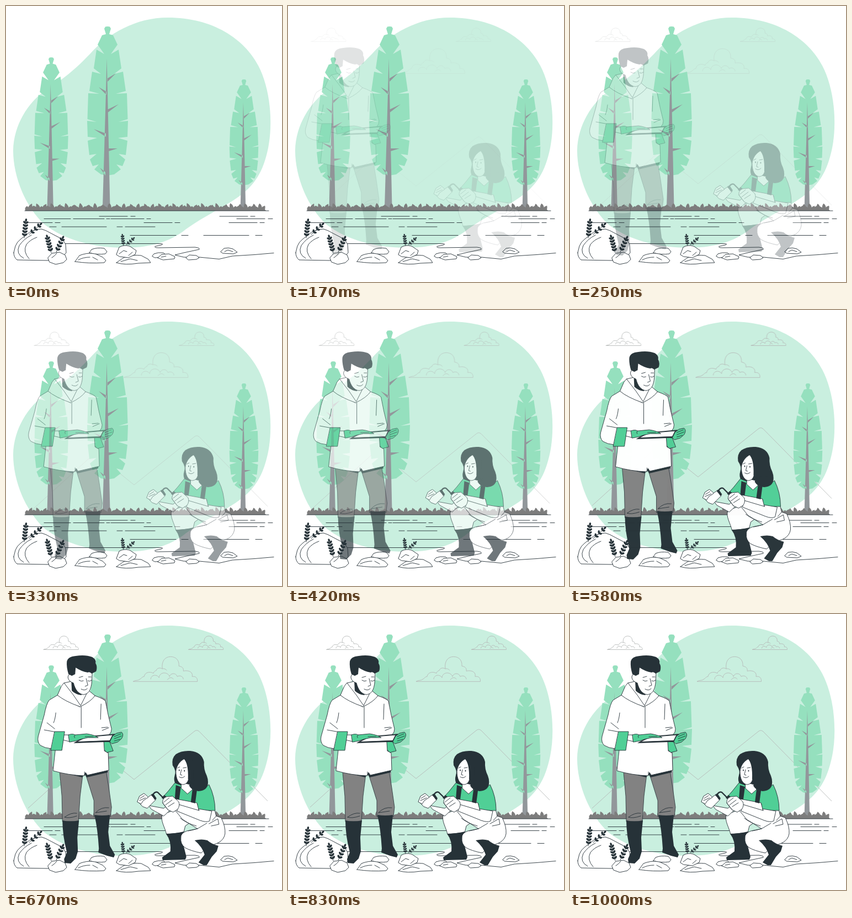
Animation, 500 px wide and 500 px high, one loop 1040 ms. Source, as an HTML page:

```html
<!DOCTYPE html>
<html lang="en">
<head>
<meta charset="utf-8">
<title>Water samples</title>
<style>
html, body { margin: 0; width: 100%; height: 100%; overflow: hidden; background: #fff; }
svg { display: block; width: 100vw; height: 100vh; }
.line { fill: none; }
.line, .white, .green { stroke: #263238; stroke-width: .9; stroke-linejoin: round; stroke-linecap: round; }
.white { fill: #fff; }
.green { fill: #50cf96; }
.dark { fill: #263238; }
.pants { fill: #828282; stroke: #263238; stroke-width: .8; }
.far { fill: none; stroke: #b6b9b8; stroke-width: .9; }
.far path { vector-effect: non-scaling-stroke; }
</style>
</head>
<body>
<svg viewBox="0 0 500 500">
  <path fill="#c9efdf" d="M293 21C375 21 432 60 457 108C479 150 484 212 475 257C466 301 450 325 422 345C395 365 350 385 320 409C290 430 255 438 214 438C160 438 106 424 70 396C36 365 13 310 13 262C14 215 40 175 72 152C105 132 125 115 152 87C185 50 235 21 293 21Z"/>
  <g id="clouds" class="far"></g>
  <path id="hills" class="far" d="M40 350L157 244Q161 241 165 244L232 298L341 211Q345.5 207 350 211L474 337"/>
  <g id="trees"></g>
  <g id="bank"></g>
  <g id="water"></g>
  <g id="rocks"></g>
  <g id="plants"></g>
  <g id="man"></g>
  <g id="woman"></g>
</svg>
<script>
const $ = id => document.getElementById(id);
const path = (cls, d, extra = '') => `<path class="${cls}" d="${d}" ${extra}/>`;
const place = (x, y, s, body) => `<g transform="translate(${x} ${y}) scale(${s})">${body}</g>`;

// Clouds, drawn at the size of the large one
const cloud = path('', 'M0 0H116.5C117 -6 114 -10 107 -9C109 -17 101 -21 91 -19C92 -24 89 -27 83 -28C84 -39 77 -45 68 -45C58 -45 51 -37 53 -23C48 -26 43 -24 42 -20C39 -19 37 -17 37 -15C29 -19 21 -16 20 -9C16 -9 15 -5 12 -4C9 -1 4 -3 0 0Z') +
  path('', 'M32 -4C32 -12 43 -14 47 -7C48 -18 63 -18 66 -9M62 -3C66 -9 72 -7 73 -4M66 -9C68 -16 78 -16 80 -9C85 -12 91 -9 91 -4M53 -23C56 -24 60 -22 61 -20');
$('clouds').innerHTML = place(232, 122.3, 1, cloud) +
  place(69.5, 64.5, .545, cloud) + place(332, 64.5, .545, cloud);

// Trees: one half of the crown, mirrored
const half = [[0, 0], [4, .5], [6, 4], [3, 14], [10, 16], [18, 33], [6, 50], [20, 42], [25, 76], [12, 86], [28, 82],
  [33, 117], [15, 122], [35, 121], [36.5, 168], [20, 173], [37, 171], [36, 200], [19, 202], [36, 207], [33, 233],
  [20, 231], [32, 241], [27, 253], [16, 250], [24, 259], [12, 268], [0, 270]];
const crown = half.concat(half.map(([x, y]) => [-x, y]).reverse()).join(' ');
const branch = (x, y, tx, ty) => `M${x} ${y - 3}L${tx} ${ty}L${x} ${y + 3}Z`;
const wood = 'M-1.5 58L0 120L4.5 328H-9L-3 120Z' + branch(0, 97, 15, 85) + branch(-2, 121, -16, 110) +
  branch(-1, 154, 20, 141) + branch(-3, 197, -25, 186) + branch(-1, 224, 18, 221) + branch(-4, 267, -14, 256);
const tree = `<polygon fill="#95e0be" points="${crown}"/><path fill="#92979b" d="${wood}"/>`;
$('trees').innerHTML = place(184, 37, 1, tree) + place(82, 93, .83, tree) + place(431, 133, .71, tree);

// Grass on the bank
let grass = 'M34 371L38 367H468L471 371Z';
for (let i = 0; i < 84; i++) {
  const x = 38 + i * 5.15, h = 8.5 + 5.5 * Math.sin(i * 1.9) ** 4, lean = 4 * Math.sin(i * 1.3);
  grass += `M${x - 3} 371Q${x - 5} ${371 - h * .7} ${x + lean} ${371 - h}Q${x + 5} ${371 - h * .7} ${x + 3} 371Z`;
}
$('bank').innerHTML = `<path fill="#7d7d7d" d="${grass}"/>` + path('line', 'M34 371H476');

// Ripples: y, then pairs of start and end
const ripples = [[381, 169, 220, 226, 234, 387, 438, 443, 451], [385.5, 69, 117, 122, 178, 182, 188, 190, 250, 255, 262, 418, 469, 475, 483],
  [392.5, 35, 84, 89, 98, 250, 301, 306, 315, 404, 455, 460, 468], [400, 79, 91, 101, 182, 201, 211, 216, 270],
  [415.5, 225, 308, 318, 330, 358, 440, 452, 464]];
$('water').innerHTML = path('line', ripples.map(([y, ...xs]) =>
  xs.map((x, i) => i % 2 ? `H${x}` : `M${x} ${y}`).join('')).join('')) +
  path('line', 'M20 430.5H280Q287 431 281 433L270 435.5Q268 438 276 438L342 437Q352 438 350 441L322 447L306 451L322 455H350L386 458.5L410 453L450 450.5L485 447.5');

$('rocks').innerHTML = [
  'M14 447L17 435Q20 427 27 422L44 409Q54 404 64 404Q72 406 80 411L103 423L108 432L109 447L99 458L75 461L20 460Q14 455 14 447Z',
  'M76 456L83 448L97 446L107 451L110 459L104 465L90 468L79 464Z',
  'M125 463L133 452Q145 447 160 448L175 455L181 461L178 465Q150 467 125 463Z',
  'M151 447L155 441Q165 437 178 439L183 445L180 449Q165 451 151 447Z',
  'M200 465L213 456Q230 450 245 452L258 459L262 465L240 466Q215 470 200 465Z',
  'M200 450L205 437Q213 432 224 435L236 443L234 450L222 456L206 454Z',
  'M265 453L268 449Q275 446 285 447L290 451L286 455L270 456Z',
  'M275 456L282 450L295 449L306 454L305 458L285 460Z',
  'M326 456L332 451L345 452L350 456L345 459L331 460Z',
  'M389 445L395 439Q403 437 411 440L419 446L412 449L393 448Z'
].map(d => path('white', d)).join('') +
  path('line', 'M32 457Q17 449 24 434Q32 422 46 415M42 458Q30 445 37 432Q44 423 56 419M92 448Q87 454 83 456M131 460Q140 455 152 455M157 455L166 460M205 449L213 443L219 445M222 452L229 446M208 463L225 458L238 461M396 445L402 442L411 445M281 455L290 453');

// Sprig: a stem with paired leaves
const sprig = (x0, y0, x1, y1, size, pairs) => {
  const turn = Math.atan2(y1 - y0, x1 - x0) * 180 / Math.PI;
  const leaf = (x, y, a) => `<ellipse class="dark" cx="${size}" rx="${size}" ry="${size * .6}" transform="translate(${x} ${y}) rotate(${a})"/>`;
  let out = path('line', `M${x0} ${y0}L${x1} ${y1}`) + leaf(x1, y1, turn);
  for (let i = 0; i < pairs; i++) {
    const k = (i + .7) / pairs * .95, x = x0 + (x1 - x0) * k, y = y0 + (y1 - y0) * k;
    out += leaf(x, y, turn - 48) + leaf(x, y, turn + 48);
  }
  return out;
};
$('plants').innerHTML = sprig(33, 420, 36, 391, 3, 5) + sprig(42, 414, 61, 397, 2.9, 3) +
  sprig(82, 447, 75, 420, 3, 5) + sprig(91, 446, 102, 422, 3, 4) +
  sprig(213, 434, 211, 417, 2.1, 4) + sprig(218, 433, 230, 422, 2.1, 3);

$('man').innerHTML =
  path('pants', 'M99 286L103 330L104 376H133L136 330L141 290Z') +
  path('pants', 'M146 290L161 338L161 367H191L193 350L188 315L183 284Z') +
  path('dark', 'M104 374Q118 377 134 374L131 405L132 430L128 443L119 452L108 451L107 444L112 432Q104 400 104 374Z') +
  path('dark', 'M162 364Q176 366 190 364L187 395L190 420L199 436L197 441L185 438L169 432L170 425Q168 390 162 364Z') +
  path('line', 'M108 368Q120 359 130 361M108 368Q115 371 130 366M164 360Q174 349 188 351M164 360L184 357') +
  path('dark', 'M97 285L140 296L144 290L148 296L186 287V283H97Z') +
  path('green', 'M179 230L190 232L196 248L184 251L179 245Z') +
  path('white', 'M95 147L80 156Q75 162 71 183L60 222Q58 232 64 238Q72 243 84 244L91 247L87 284Q115 292 143 293L146 287L149 292L188 283L187 252L180 248L179 232L192 214L193 208L187 183L182 158Q180 154 163 148L136 168Z') +
  path('line', 'M138 168V206M92 179Q91 190 88 197M71 210L93 214M76 197L90 208M174 163L173 191M175 206L186 205M176 211L188 206M144 293V286') +
  path('white', 'M107 125L120 122L151 138L163 148Q155 159 136 168Q108 158 95 147L102 131Z') +
  path('line', 'M107 125L124 147L137 166L146 148L151 138') +
  path('dark', 'M120 120L121 139Q128 146 139 147L131 130Z') +
  path('white', 'M125 96L158 104L157 125C155 140 150 145 142 146C133 145 127 137 124 125Q115 122 114 115Q114 108 121 109Z') +
  path('dark', 'M112 86Q114 77 128 76Q145 73 158 78Q166 83 164 89Q168 96 165 104L157 108Q153 104 150 106Q138 104 128 97L127 109L121 112L115 109Q111 96 112 86Z') +
  path('line', 'M134 120Q138 123 142 121M150 121Q153 123 157 120M134 115L141 113M151 114L156 114M147 117L150 129L145 131M138 136Q145 140 149 135') +
  path('white', 'M105 219L116 219L117 231L104 228Z') +
  path('green', 'M90 213L108 213L103 247L83 247Z') +
  path('dark', 'M124 234L143 222L200 217L194 231.500Z') +
  path('white', 'M130 231.500L147 223L195 219L190 229Z') +
  path('green', 'M115 219Q122 216 127 219L148 217Q162 219 169 224L150 224Q138 226 128 230L117 232Z') +
  path('line', 'M127 219Q124 221 126 224M145 222L160 222') +
  path('green', 'M190 231L195 221L202 216L211 214Q216 218 211 226L204 232L194 235Z') +
  path('line', 'M198 222L210 217M198 226L211 221M198 230L208 227');

$('woman').innerHTML =
  path('dark', 'M300 274Q298 261 306 254Q316 247 332 248Q353 250 357 268Q356 281 362 293Q367 306 361 315Q351 324 333 318L306 309Q301 302 304 292Q307 284 300 274Z') +
  path('white', 'M281 365C278 375 286 386 289 399L320 396L323 384L340 372L318 357Q294 354 281 365Z') +
  path('dark', 'M288 398Q304 398 321 394L320 420L325 440L323 445L282 446L281 441L296 430Q298 411 288 398Z') +
  path('white', 'M306 332L345 342L350 353L376 354L379 366L388 369Q396 385 395 398C393 412 378 419 366 418L352 433Q332 429 322 423Q314 416 315 406Q314 397 326 393L345 389L318 372L305 356Z') +
  path('line', 'M345 389L362 379M314 370Q325 379 343 384M366 380L382 371L384 381L370 384M379 366L372 374M345 389Q335 392 328 393') +
  path('dark', 'M340 410Q353 407 363 410Q371 417 383 420L380 430L371 440L362 455H356L347 450L358 436Q354 422 340 410Z') +
  path('white', 'M257 347L284 352L291 346L296 355L284 366L262 354Z') +
  path('green', 'M304 306L292 321L283 331L304 337L345 344V356L377 356Q377 331 366 309Q352 323 333 317Z') +
  path('white', 'M306 335L344 342L348 357L318 358L304 348Z') +
  path('white', 'M316 305L332 309L336 318L327 326L316 316Z') +
  path('dark', 'M306 310L315 313L312 336L304 335ZM336 318L344 320L341 343L333 341Z') +
  path('dark', 'M333 303Q352 297 364 307Q363 320 347 321Q334 319 330 311Z') +
  path('white', 'M322 262C313 266 307 275 306 285C306 298 310 307 318 309C324 309 328 305 329 298L332 280Z') +
  path('dark', 'M320 262Q329 270 328 299L339 310L336 262Z') +
  path('line', 'M309 279L313 277M319 279L325 278M316 282L314 291L317 292M312 295Q317 299 322 294') +
  '<ellipse class="dark" cx="312" cy="283" rx=".9" ry="1.5"/><ellipse class="dark" cx="321.500" cy="284" rx=".9" ry="1.5"/>' +
  path('white', 'M347 353L371 357L367 375Q361 378 350 374L308 357L311 345L348 356Z') +
  path('line', 'M264 328Q268 321 273 323L283 333', 'style="stroke-width:2.400"') +
  path('white', 'M240 342L261 328L270 336L254 352L246 349Z') +
  path('dark', 'M261 327L265 325L271 334L268 337ZM280 333L285 328L289 331L284 336Z') +
  path('white', 'M236 340L240 330L248 325L252 328L256 332L247 338L243 344Z') +
  path('line', 'M241 334L249 329M240 338L251 333') +
  path('white', 'M282 342Q281 334 289 331L300 330L311 340Q314 347 309 354L301 359L292 355Z') +
  path('line', 'M284 341L294 333M287 346L299 337M292 349L303 342M282 342Q286 348 292 355');

// Cubic Bezier easing that overshoots before it settles
const bez = (t, a, b) => 3 * (1 - t) ** 2 * t * a + 3 * (1 - t) * t * t * b + t ** 3;
function ease(x) {
  let lo = 0, hi = 1;
  for (let i = 0; i < 24; i++) {
    const mid = (lo + hi) / 2;
    if (bez(mid, .36, .5) < x) lo = mid; else hi = mid;
  }
  return bez(lo, -.01, 1.38);
}

const LOOP = 1040, STEPS = 25, TRAVEL = 30, PEAK = 1.066;
const show = (id, x, y, opacity) => {
  $(id).setAttribute('transform', `translate(${x} ${y})`);
  $(id).setAttribute('opacity', opacity);
};
function draw(ms) {
  const step = Math.min(STEPS - 1, Math.floor((ms % LOOP + 6) * STEPS / LOOP));
  const y = ease(Math.min(1, step / (STEPS - 1) + .022));
  const away = TRAVEL * (PEAK - y);
  const opacity = step < 2 ? 0 : Math.max(0, Math.min(1, y * 1.07));
  show('man', -away, 0, opacity);
  show('clouds', -away, 0, opacity);
  show('woman', away, 0, opacity);
  show('hills', 0, away, opacity);
}

const start = performance.now();
function tick() {
  draw(performance.now() - start);
  requestAnimationFrame(tick);
}
tick();
</script>
</body>
</html>
```
